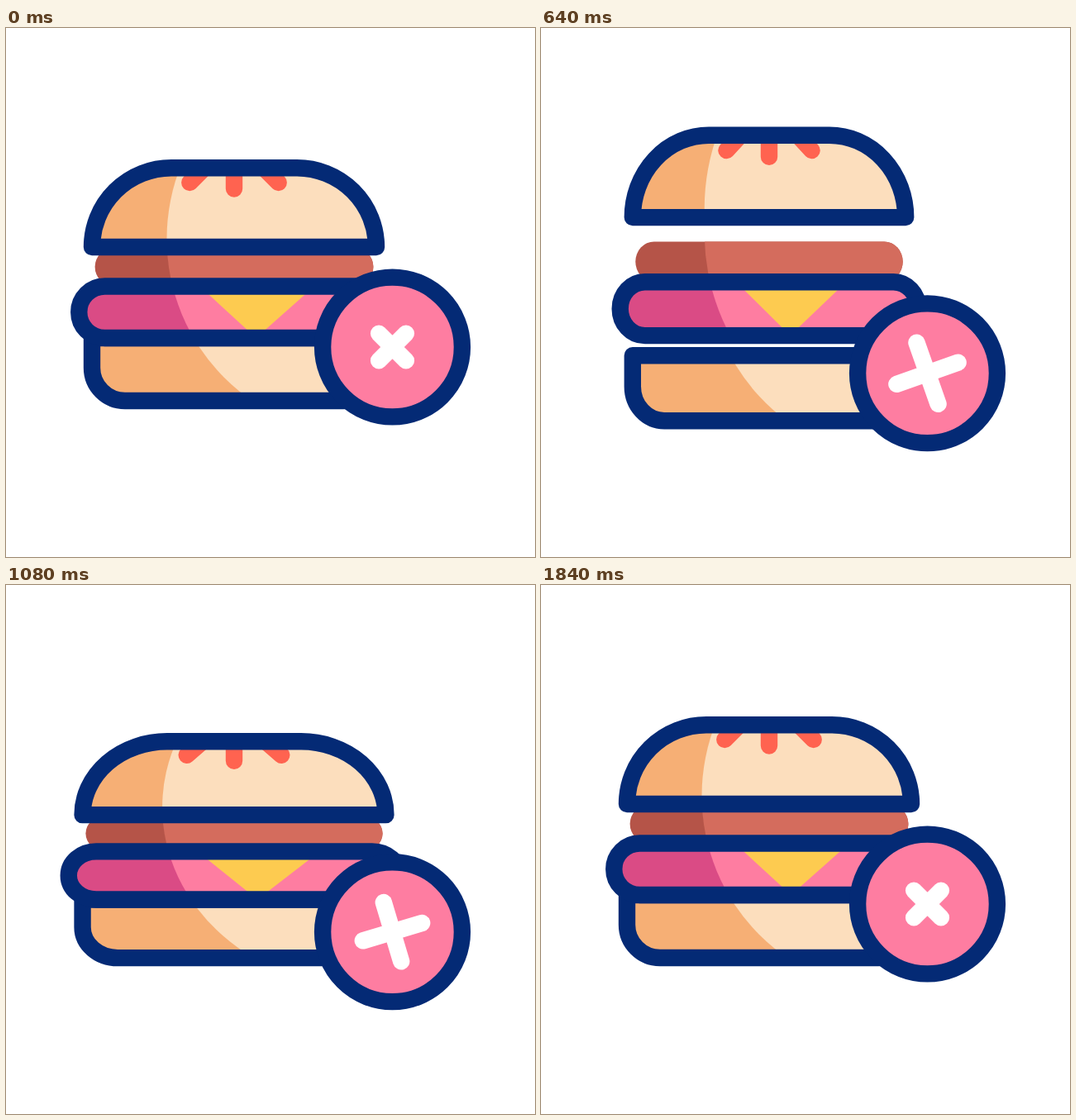
Animation of 640 by 640 pixels, one loop 1.88 s. Source, as an HTML page:

```html
<!DOCTYPE html>
<html lang="en">
<head>
<meta charset="utf-8">
<title>Burger with cross badge</title>
<style>
  @property --sx { syntax: "<number>"; inherits: true; initial-value: 1; }
  @property --sy { syntax: "<number>"; inherits: true; initial-value: 1; }
  @property --gap { syntax: "<number>"; inherits: true; initial-value: 0; }
  @property --drop { syntax: "<length>"; inherits: true; initial-value: 0px; }
  @property --turn { syntax: "<angle>"; inherits: true; initial-value: 0deg; }
  @property --len { syntax: "<number>"; inherits: true; initial-value: 1; }

  html, body { margin: 0; width: 100%; height: 100%; overflow: hidden; background: #fff; }
  svg { display: block; width: 100%; height: 100%; }
  path, circle { vector-effect: non-scaling-stroke; }

  .line { fill: none; stroke: #042a75; stroke-width: 20.4; stroke-linejoin: round; }
  .lit { clip-path: url(#light); }
  .bun { fill: #fcdebd; }
  .bun-dark { fill: #f6af75; }
  .marks { fill: none; stroke: #ff6350; stroke-width: 20.4; stroke-linecap: round; }
  .cross { fill: none; stroke: #fff; stroke-width: 20.4; stroke-linecap: round; }

  #burger, #badge {
    animation: 1880ms cubic-bezier(.3333, 0, .6667, 1) infinite;
  }
  #burger {
    animation-name: bounce;
    transform-origin: 276px 451px;
    transform: scale(var(--sx), var(--sy));
  }
  #top { transform: translateY(calc(var(--gap) * -37.7px)); }
  #bottom { transform: translateY(calc(var(--gap) * 31.7px)); }

  #badge {
    animation-name: sink, spin, stretch;
    transform: translate(467.5px, calc(386px + var(--drop)));
  }
  .cross { transform: rotate(var(--turn)) scale(var(--len)); }

  /* squash, jump apart, squash, settle */
  @keyframes bounce {
    0%, 8.51% { --sx: 1; --sy: 1; --gap: 0; }
    22.71% { --sx: 1.067; --sy: .928; --gap: 0; }
    39.89% { --sx: .922; --sy: 1.078; --gap: 1; }
    58.14% { --sx: 1.067; --sy: .928; --gap: 0; }
    72.34%, 100% { --sx: 1; --sy: 1; --gap: 0; }
  }
  @keyframes sink {
    0%, 7.82% { --drop: 0px; }
    43.9%, 49.1% { --drop: 38.8px; }
    86.1%, 100% { --drop: 0px; }
  }
  @keyframes spin {
    0%, 7.93% { --turn: 0deg; }
    42.9%, 51.8% { --turn: -76.5deg; }
    74% { --turn: 14deg; }
    87.2%, 100% { --turn: 0deg; }
  }
  @keyframes stretch {
    0%, 10.85% { --len: 1; }
    42.4%, 48.7% { --len: 1.84; }
    74%, 100% { --len: 1; }
  }
</style>
</head>
<body>
<svg viewBox="0 0 640 640">
  <defs>
    <clipPath id="light"><circle cx="432" cy="255" r="237.5"/></clipPath>
    <path id="lid" d="M104 265A96 95.7 0 0 1 200 169.3H352A96 95.7 0 0 1 448 265Z"/>
    <path id="base" d="M104 375H448V411A40 40 0 0 1 408 451H144A40 40 0 0 1 104 411Z"/>
    <path id="patty" d="M131 265.6H421A23.4 23.4 0 0 1 421 312.4H131A23.4 23.4 0 0 1 131 265.6Z"/>
    <path id="ham" d="M119.5 312.5H432.5A31.2 31.2 0 0 1 432.5 375H119.5A31.2 31.2 0 0 1 119.5 312.5Z"/>
  </defs>

  <g id="burger">
    <g id="bottom">
      <use href="#base" class="bun-dark"/>
      <g class="lit"><use href="#base" class="bun"/></g>
      <use href="#base" class="line"/>
    </g>

    <use href="#patty" fill="#b55448"/>
    <g class="lit"><use href="#patty" fill="#d46c5d"/></g>

    <use href="#ham" fill="#da4b85"/>
    <g class="lit"><use href="#ham" fill="#fe7da1"/></g>
    <path d="M234.5 312.5H373L302.5 375Z" fill="#fdcb50"/>
    <use href="#ham" class="line"/>

    <g id="top">
      <use href="#lid" class="bun-dark"/>
      <g class="lit"><use href="#lid" class="bun"/></g>
      <path class="marks" d="M222.3 187L239.3 170M276 172V194.5M329.7 187L312.7 170"/>
      <use href="#lid" class="line"/>
    </g>
  </g>

  <g id="badge">
    <circle r="84.4" fill="#fe7da1"/>
    <circle r="84.4" class="line"/>
    <path class="cross" d="M-16.4 -16.4L16.4 16.4M16.4 -16.4L-16.4 16.4"/>
  </g>
</svg>
</body>
</html>
```
